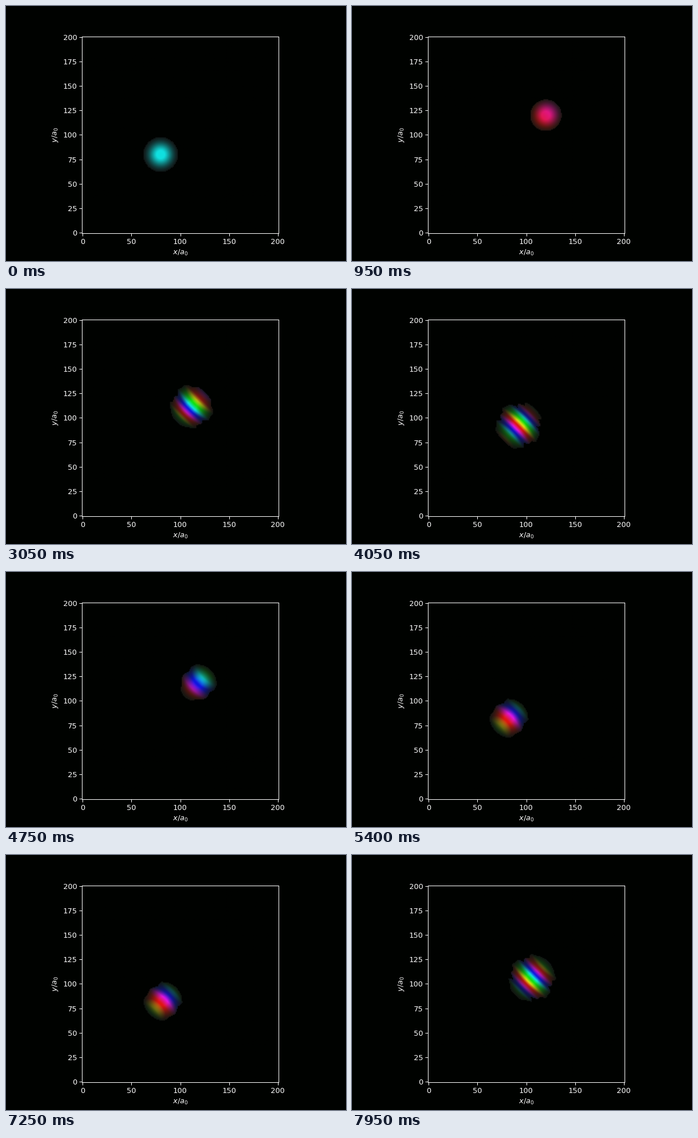
Animation of 600 by 450 pixels, one loop 8000 ms. Source, as a matplotlib script:

```python
import numpy as np
import matplotlib.pyplot as plt
from matplotlib.animation import FuncAnimation
from matplotlib.colors import hsv_to_rgb

FRAMES, STEP_MS = 160, 50
PERIOD_MS = 1850
MID, SWING = 100, 20          # oscillation centre and amplitude on each axis
OMEGA = 1 / 88                # inverse squared width of the ground state
A0 = 1 / 64                   # inverse squared width of the starting packet
PEAK, CUT = 0.88, 0.08        # brightest value, dimmest visible luminance
BACK = np.array([0, 2, 0]) / 255
HALO = np.array([16, 22, 17]) / 255
LUMA = np.array([0.30, 0.59, 0.11])

x, y = np.meshgrid(np.arange(201), np.arange(201))


def packet(tau):
    """Phase and magnitude of a squeezed state in a harmonic trap."""
    c, s = np.cos(tau), np.sin(tau)
    centre = MID - SWING * c
    dx, dy = x - centre, y - centre
    r2 = dx**2 + dy**2
    spread = OMEGA * c + 1j * A0 * s
    a = OMEGA * (A0 * c + 1j * OMEGA * s) / spread
    action = -OMEGA * SWING**2 / 2 * np.sin(2 * tau)
    phase = (action - np.angle(spread) + OMEGA * SWING * s * (dx + dy)
             - a.imag * r2 / 2)
    return phase, np.exp(-a.real * r2 / 2)


def picture(i):
    phase, size = packet(2 * np.pi * i * STEP_MS / PERIOD_MS)
    hue = (phase / (2 * np.pi) + 0.5) % 1
    value = np.minimum(size, PEAK)
    pure = hsv_to_rgb(np.dstack([hue, np.ones_like(hue), np.ones_like(hue)]))
    lit = value * (0.25 + pure @ LUMA) > CUT
    rgb = np.maximum(pure * value[..., None], HALO)
    return np.where(lit[..., None], rgb, BACK)


plt.style.use("dark_background")
plt.rcParams["font.family"] = "DejaVu Sans"
fig, ax = plt.subplots(figsize=(6.4, 4.8), dpi=93.75, facecolor=BACK)
fig.subplots_adjust(top=0.879)
ax.set_facecolor(BACK)
image = ax.imshow(picture(0), origin="lower")
ax.set_xticks(range(0, 201, 50))
ax.set_yticks(range(0, 201, 25))
ax.set_xlabel("$x/a_0$")
ax.set_ylabel("$y/a_0$")


def update(i):
    image.set_data(picture(i))
    return [image]


anim = FuncAnimation(fig, update, frames=FRAMES, interval=STEP_MS,
                     repeat=True, repeat_delay=0)
plt.show()
```
